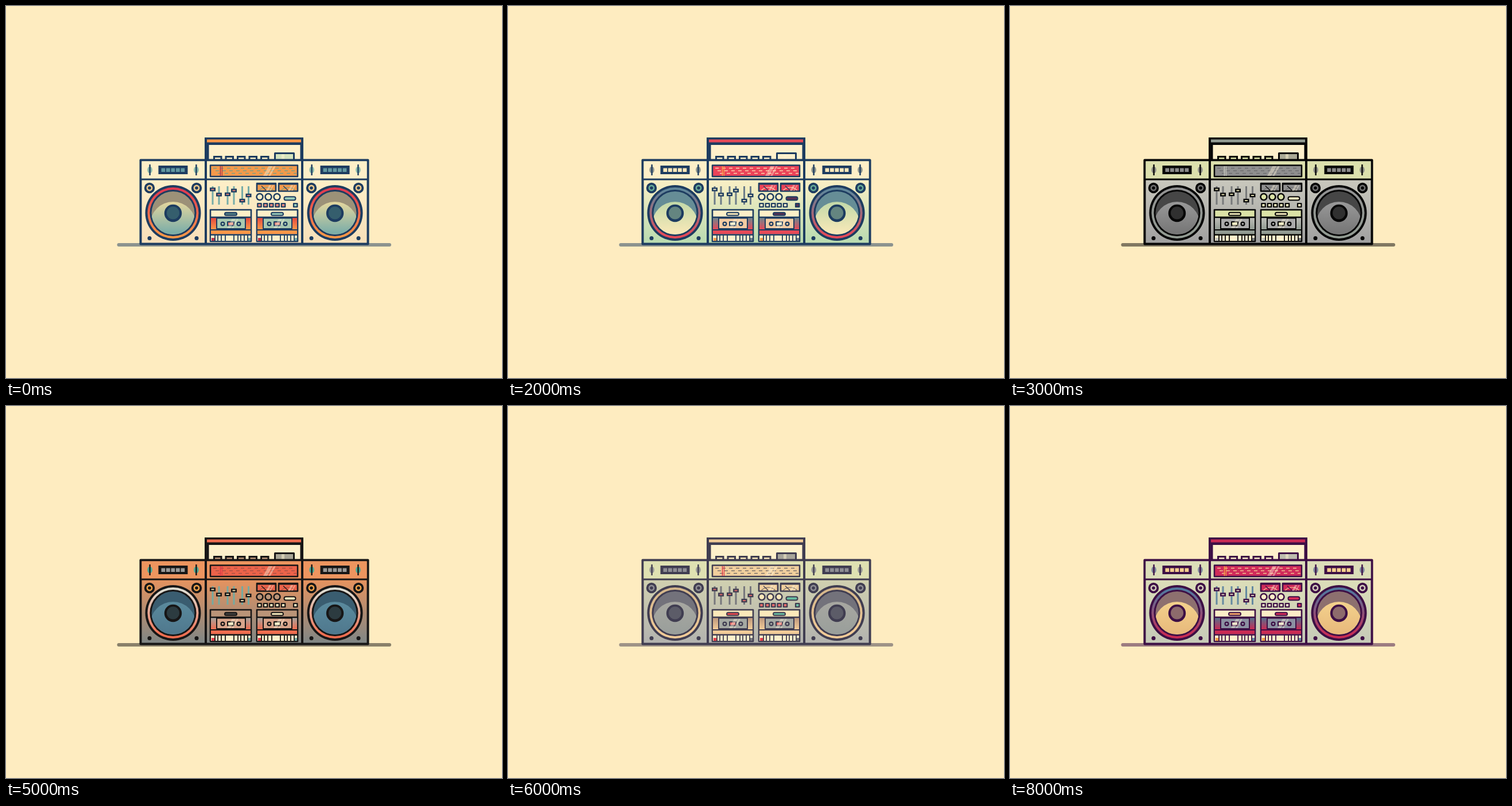
Write an HTML page with a canvas that moves like this. It is 864 px wide and 648 px high and loops after 9 s.

```html
<!DOCTYPE html>
<html lang="en">
<head>
<meta charset="utf-8">
<title>Boombox</title>
<style>
html, body { margin: 0; width: 100%; height: 100%; overflow: hidden; background: #feecc0; }
canvas { display: block; width: 864px; height: 648px; }
</style>
</head>
<body>
<canvas id="stage" width="864" height="648"></canvas>
<script>
const canvas = document.getElementById('stage');
const g = canvas.getContext('2d');
const HOLD = 1000, CREAM = '#fef0cb';

// One row per part, one column per colour scheme.
const paint = {
  ink:    '#1d3c60 #1d3c60 #060606 #171616 #403d51 #3d0f45',
  knob:   '#d5e4bd #fef0cb #a9a995 #a8a596 #a6a49a #bdbcae',
  stripe: '#fb9748 #e54a58 #929b92 #ef6d4f #f1cb98 #c92b54',
  panel:  '#fdefc8 #fdefc8 #dce0ad #ed955f #dfe1b2 #dcdeb9',
  top:    '#fdefc8 #faefc5 #c9c8bd #e5935f #d0d0b0 #dcdeb9',
  base:   '#f7dfb9 #b9dbb0 #a0a0a0 #7f8685 #b3b3af #c6cab8',
  tuner:  '#f39a4b #ec4358 #8f8f8f #ec634a #f1cf9d #d02b5a',
  dash:   '#6e9f8c #fde6b8 #68686a #a05044 #6b6464 #f6d59a',
  needle: '#ba3448 #f89b48 #c4c4bb #e23b48 #e5404b #f39b43',
  shade:  '#9c9178 #668d96 #464646 #3a5d70 #73727b #8d706f',
  lit:    '#e3d69e #c3d9a9 #989898 #5a8a9d #a7a7a1 #f3d18c',
  deep:   '#7daea8 #f6e8b7 #777777 #50798e #9a9f9b #e8ba7c',
  ring:   '#e13c50 #60869a #929292 #dedbd0 #d5b78c #53779d',
  cap:    '#355e6d #648580 #303030 #2c3b40 #5c5c68 #8d6b6c',
  dial:   '#8cbcab #8e948d #8e8e86 #4aa995 #9a9a96 #7e879c',
  cell:   '#6198a0 #fde9bb #8a8a8a #9b9a98 #8e8e94 #f6cf8e',
  tweet:  '#f1cb8c #69ad99 #707070 #f2a34b #8f8e94 #d4cebc',
  track:  '#76aca8 #6c7c89 #77797a #75aaa0 #77777d #6489a1',
  pillA:  '#537d84 #f9e7b9 #eee9b8 #403f3d #e2494d #f1a367',
  pillB:  '#9bcbb9 #573153 #f7ecbf #fbeebf #68bca1 #d52d59',
  head:   '#fdefc8 #fdefc8 #dbe2a6 #ba9478 #fbe8ba #fbecc7',
  side:   '#e3493f #70888e #bdbdb7 #a8a49d #be987c #55718d',
  tape:   '#a9c9b0 #f3cba2 #aaaaaa #d9a58b #a5a9a3 #8b91a2',
  button: '#e9857a #fdefc8 #eee9b8 #fbe8ba #e66b6a #e4ddc3'
};
const channel = (hex, i) => parseInt(hex.slice(1 + i * 2, 3 + i * 2), 16);
const blend = (a, b) => 'rgb(' + [0, 1, 2].map(i =>
  Math.round((channel(a, i) + channel(b, i)) / 2)) + ')';

// Every middle scheme sits halfway between its neighbours.
const schemes = [];
for (let i = 0; i < 9; i++) {
  const k = Math.floor(i / 3) * 2, c = {};
  for (const part in paint) {
    const row = paint[part].split(' ');
    c[part] = i % 3 === 0 ? row[k] : i % 3 === 2 ? row[k + 1] : blend(row[k], row[k + 1]);
  }
  schemes.push(c);
}

function rect(x, y, w, h, fill) {
  g.fillStyle = fill;
  g.fillRect(x, y, w, h);
}
function box(x, y, w, h, fill, ink, width) {
  rect(x, y, w, h, fill);
  g.strokeStyle = ink;
  g.lineWidth = width;
  g.strokeRect(x, y, w, h);
}
function line(x1, y1, x2, y2, color, width) {
  g.strokeStyle = color;
  g.lineWidth = width;
  g.beginPath();
  g.moveTo(x1, y1);
  g.lineTo(x2, y2);
  g.stroke();
}
function disc(x, y, r, fill) {
  g.fillStyle = fill;
  g.beginPath();
  g.arc(x, y, r, 0, Math.PI * 2);
  g.fill();
}
function fade(y1, y2, a, b) {
  const f = g.createLinearGradient(0, y1, 0, y2);
  f.addColorStop(0, a);
  f.addColorStop(1, b);
  return f;
}
function pill(x, y, w, h, fill, ink) {
  g.beginPath();
  g.roundRect(x - w / 2, y - h / 2, w, h, h / 2);
  g.fillStyle = fill;
  g.fill();
  g.strokeStyle = ink;
  g.lineWidth = 2;
  g.stroke();
}
function shine(x, y, h, w) {
  const lean = h * 0.55;
  g.fillStyle = 'rgba(255,246,220,.42)';
  for (const [dx, width] of [[0, w], [w + 2, w * 0.5]]) {
    g.beginPath();
    g.moveTo(x + dx + lean, y);
    g.lineTo(x + dx + lean + width, y);
    g.lineTo(x + dx + width, y + h);
    g.lineTo(x + dx, y + h);
    g.fill();
  }
}

function handle(c) {
  rect(346, 229, 172, 40, c.ink);
  rect(350, 232.5, 164, 5, c.stripe);
  rect(353.5, 242, 159, 27, CREAM);
  for (let i = 0; i < 5; i++) {
    const x = 361 + i * 20.5;
    rect(x, 261, 15.5, 7, c.ink);
    rect(x + 3, 264, 9.5, 4, c.head);
  }
  box(468.5, 256.5, 33, 12, c.knob, c.ink, 3);
  rect(480, 258, 5, 9, 'rgba(255,246,210,.5)');
}

function speaker(x, c) {
  for (const dx of [-41, 41]) {
    disc(x + dx, 317, 9.2, c.ink);
    disc(x + dx, 317, 5.4, c.tweet);
    disc(x + dx, 317, 2.8, c.ink);
    disc(x + dx, 404.5, 3.5, c.ink);
    g.fillStyle = c.dial;
    g.beginPath();
    g.ellipse(x + dx * 0.985, 285.5, 4.3, 6, 0, 0, Math.PI * 2);
    g.fill();
    line(x + dx * 0.985, 276, x + dx * 0.985, 295, c.ink, 2.4);
  }
  rect(x - 25.5, 278, 51, 15, c.ink);
  for (let i = 0; i < 5; i++) rect(x - 20.5 + i * 8.5, 282.5, 6.8, 6.5, c.cell);

  disc(x, 360.5, 48.5, c.ink);
  disc(x, 360.5, 44.5, fade(322, 400, c.ring, c.stripe));
  disc(x, 360.5, 40.5, c.ink);
  disc(x, 360.5, 37.5, c.shade);
  g.save();
  g.beginPath();
  g.arc(x, 360.5, 37.5, 0, Math.PI * 2);
  g.clip();
  g.beginPath();
  g.arc(x, 381, 40, 0, Math.PI * 2);
  g.fillStyle = fade(342, 394, c.lit, c.deep);
  g.fill();
  g.restore();
  disc(x, 361, 15.2, c.ink);
  disc(x, 360.5, 11, c.cap);
}

function tuner(c) {
  box(356, 277.5, 152, 19.5, c.tuner, c.ink, 2.5);
  for (let row = 0; row < 3; row++) {
    for (let x = 361 + row * 4; x < 504; x += 12) {
      line(x, 282.5 + row * 4.5, Math.min(x + 6, 506), 282.5 + row * 4.5, c.dash, 1.3);
    }
  }
  line(373.5, 279, 373.5, 296, c.needle, 1.7);
  line(376.5, 279, 376.5, 296, c.needle, 1.3);
  shine(448, 279, 17, 7);
}

function controls(c) {
  const grips = [[360, 319.5], [371, 328.5], [386, 328], [397, 321.5], [411.5, 339], [422.5, 330]];
  for (const [x, y] of grips) {
    line(x, 314, x, 346, c.track, 3);
    rect(x - 5, y - 3.2, 10, 6.4, c.ink);
    rect(x - 2.5, y - 0.9, 5, 1.8, c.button);
  }
  for (const x of [437, 475]) {
    box(x, 309, 33, 13.5, c.tuner, c.ink, 2.6);
    rect(x, 309, 33, 2.4, c.ink);
    g.strokeStyle = c.dash;
    g.lineWidth = 1.2;
    g.beginPath();
    g.arc(x + 16.5, 333, 17, Math.PI * 1.25, Math.PI * 1.75);
    g.stroke();
    line(x + 16, 321, x + 8, 313.5, c.ink, 1.2);
    shine(x + 16, 312, 10, 4);
  }
  for (const x of [442, 457, 472]) {
    disc(x, 332.5, 6.7, c.ink);
    disc(x, 332.5, 4.2, c.head);
  }
  pill(494.5, 335.2, 20, 6, c.pillB, c.ink);
  for (const x of [441.5, 452, 462.3, 472.6, 483]) box(x - 3.2, 344, 6.4, 6, c.button, c.ink, 2.2);
  box(501, 344, 6.4, 6, c.pillB, c.ink, 2.2);
}

function deck(x, light, c) {
  box(x, 355, 71, 55, c.head, c.ink, 2.6);
  pill(x + 35.5, 362.3, 21, 5, light, c.ink);
  rect(x + 1, 369, 69, 21, fade(369, 389, c.side, c.stripe));
  line(x, 368, x + 71, 368, c.ink, 2.4);
  box(x + 11, 369.5, 50, 18.5, c.tape, c.ink, 2);
  for (const dx of [21.5, 49.5]) {
    disc(x + dx, 379.5, 4, c.ink);
    disc(x + dx, 379.5, 1.8, c.tape);
  }
  box(x + 30, 376, 11, 6.5, c.button, c.ink, 2);
  shine(x + 29, 371, 16, 6);
  rect(x + 1, 391, 69, 6.5, c.stripe);
  line(x, 390, x + 71, 390, c.ink, 2);
  line(x, 398.5, x + 71, 398.5, c.ink, 2.5);
  rect(x + 1, 400, 69, 9, CREAM);
  rect(x + 2, 404, 6, 5, c.needle);
  rect(x + 65, 404, 5, 5, c.track);
  for (const dx of [8, 13, 19, 26, 41, 48, 53, 59, 65]) line(x + dx, 399, x + dx, 410, c.ink, 1.8);
}

function draw(c) {
  rect(0, 0, 864, 648, '#feecc0');
  g.lineCap = 'round';
  g.globalAlpha = 0.5;
  line(196.5, 416, 668, 416, c.ink, 6);
  g.globalAlpha = 1;
  g.lineCap = 'butt';
  g.lineJoin = 'round';
  handle(c);
  box(234.5, 268.5, 396, 146, fade(303, 413, c.top, c.base), c.ink, 4);
  rect(236.5, 270.5, 392, 31, c.panel);
  line(234, 302, 631, 302, c.ink, 3);
  for (const x of [348, 516]) line(x, 268, x, 415, c.ink, 4);
  speaker(291, c);
  speaker(573, c);
  tuner(c);
  controls(c);
  deck(356, c.pillA, c);
  deck(437, c.pillB, c);
}

let shown = -1;
const start = performance.now();
function tick() {
  const i = Math.floor((performance.now() - start) / HOLD) % schemes.length;
  if (i !== shown) draw(schemes[shown = i]);
  requestAnimationFrame(tick);
}
tick();
</script>
</body>
</html>
```
